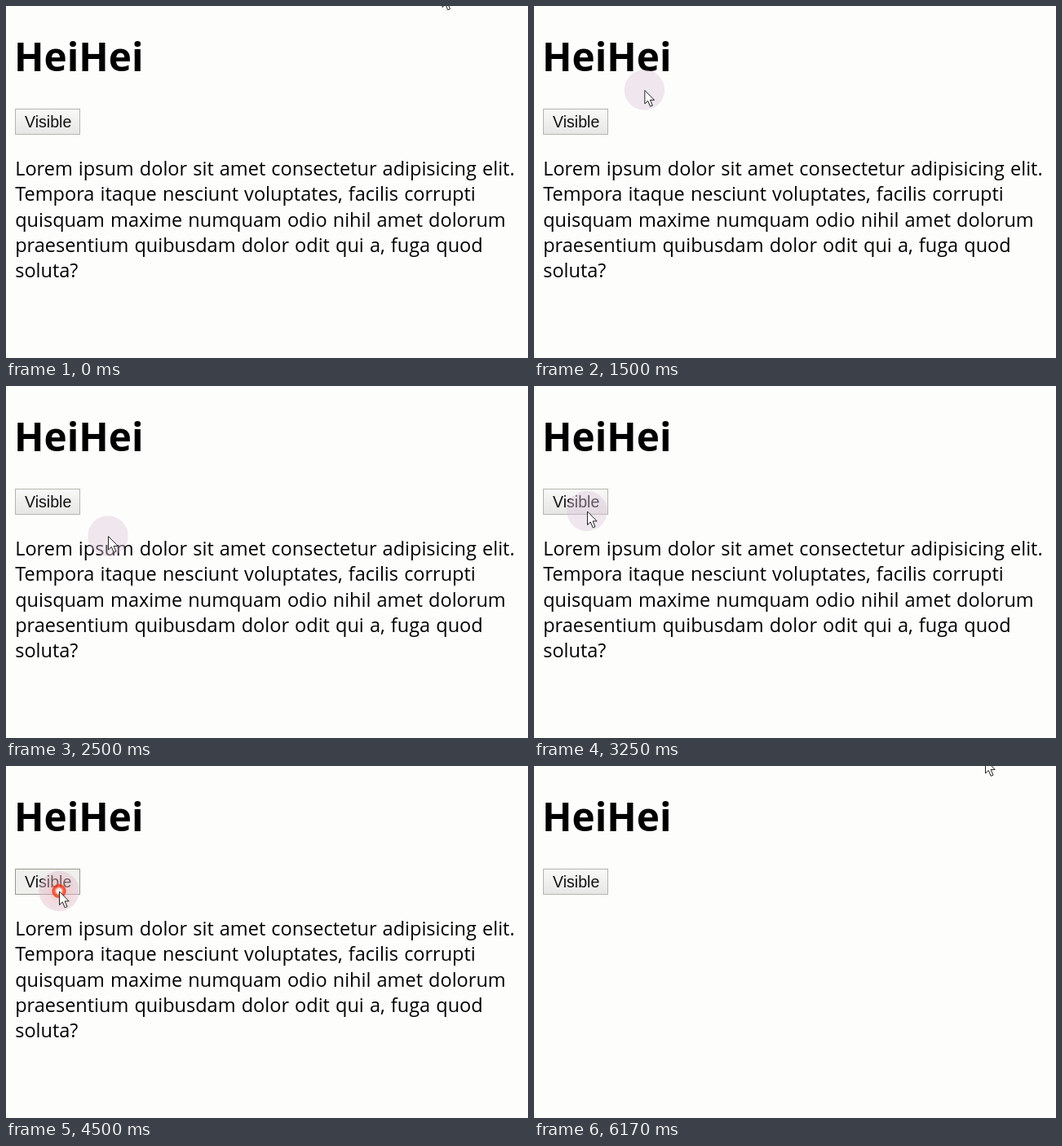
Write an HTML page that moves like this. It is 640 px wide and 432 px high and loops after 6260 ms.

```html
<!DOCTYPE html>
<html lang="en">
<head>
<meta charset="utf-8">
<title>Hover and toggle</title>
<style>
  html, body { margin: 0; width: 100%; height: 100%; overflow: hidden; background: #fdfdfb; }
  svg { display: block; width: 640px; height: 432px; }
  .body { font: 23.5px "Open Sans", "Noto Sans", sans-serif; word-spacing: 1px; }
  .title { font: bold 47.7px "Open Sans", "Noto Sans", sans-serif; }
  .label { font: 19.6px "Liberation Sans", Arial, sans-serif; }
</style>
</head>
<body>
<svg viewBox="0 0 640 432">
  <defs>
    <linearGradient id="face" x2="0" y2="1">
      <stop offset="0" stop-color="#f9f9f8"/>
      <stop offset="1" stop-color="#e6e6e5"/>
    </linearGradient>
    <radialGradient id="dot">
      <stop offset=".3" stop-color="#fff4ee"/>
      <stop offset=".6" stop-color="#f6401c"/>
      <stop offset=".85" stop-color="#ee3010"/>
      <stop offset="1" stop-color="#f05030" stop-opacity=".2"/>
    </radialGradient>
    <radialGradient id="glow">
      <stop offset="0" stop-color="#ff7050" stop-opacity=".3"/>
      <stop offset="1" stop-color="#ff9070" stop-opacity=".05"/>
    </radialGradient>
  </defs>
  <text class="title" x="10" y="79.5">HeiHei</text>
  <text id="extra" class="body" x="12" y="149">This is hide COntent</text>
  <g id="flow">
    <rect id="button" x="11.5" y="126.5" width="79" height="31" fill="url(#face)" stroke="#b4b5ac"/>
    <text class="label" x="23" y="149" fill="#111">Visible</text>
    <g id="para" class="body"></g>
  </g>
  <g id="pointer">
    <g id="halo">
      <circle r="24.7" fill="#dcc3da" fill-opacity=".4"/>
      <g id="click">
        <circle r="24.7" fill="url(#glow)"/>
        <circle id="ring" fill="url(#dot)"/>
      </g>
    </g>
    <path d="M.5 .5V17L4.3 13.4L7.2 20.3L10 19.1L7.1 12.4H12.2Z" fill="#fff" stroke="#222"/>
  </g>
</svg>
<script>
const LOOP = 6260, TICK = 1000 / 12;
const $ = id => document.getElementById(id);
const show = (el, on) => el.setAttribute('visibility', on ? 'inherit' : 'hidden');

const LINES = [
  'Lorem ipsum dolor sit amet consectetur adipisicing elit.',
  'Tempora itaque nesciunt voluptates, facilis corrupti',
  'quisquam maxime numquam odio nihil amet dolorum',
  'praesentium quibusdam dolor odit qui a, fuga quod',
  'soluta?'
];
LINES.forEach((line, i) => {
  const text = document.createElementNS('http://www.w3.org/2000/svg', 'text');
  text.setAttribute('x', 11.2);
  text.setAttribute('y', 207.8 + i * 31.4);
  text.textContent = line;
  $('para').append(text);
});

// Pointer path: tick, x, y
const PATH = [
  [0, 534.5, -15.5], [2, 420, 10], [4, 230, 50], [7, 104, 65], [8, 104, 65],
  [11, 306, 82], [13, 306, 82], [17, 140, 120], [20, 126, 69], [22, 126, 69],
  [25, 125.3, 103.3], [27, 125, 160], [28, 125, 160], [30, 125, 184], [33, 125, 38],
  [36, 65, 153.5], [62, 65, 153.5], [64, 68, 132], [66, 150, 70],
  [71, 553, -15], [74, 553, -8]
];

// Steady clicking; the paragraph toggles on release.
const PRESS = { first: 40.6, gap: 3.15, count: 7, release: 1 };

function pointerAt(tick) {
  const i = PATH.findIndex(p => p[0] >= tick);
  if (i < 1) return (i ? PATH[PATH.length - 1] : PATH[0]).slice(1);
  const [a, b] = [PATH[i - 1], PATH[i]];
  const k = (tick - a[0]) / (b[0] - a[0]);
  return [a[1] + (b[1] - a[1]) * k, a[2] + (b[2] - a[2]) * k];
}

// Number of presses begun by the given tick
function pressesBy(tick) {
  const n = Math.floor((tick - PRESS.first) / PRESS.gap) + 1;
  return Math.max(0, Math.min(PRESS.count, n));
}

function draw(ms) {
  const tick = Math.floor((ms % LOOP + 4) / TICK);
  const [x, y] = pointerAt(tick);
  const hover = tick < 60 && y > 33 && y < 98;
  show($('extra'), hover);
  $('flow').setAttribute('transform', `translate(0 ${hover ? 55.2 : 0})`);
  show($('para'), pressesBy(tick - PRESS.release) % 2 === 0);

  const presses = pressesBy(tick);
  const age = presses ? (tick - PRESS.first) - (presses - 1) * PRESS.gap : 99;
  const active = age < 3;
  show($('click'), active);
  if (active) {
    $('ring').setAttribute('r', 8 + age * 1.5);
    $('click').setAttribute('opacity', 1 - age * .25);
  }
  const down = age < PRESS.release;
  $('button').setAttribute('fill', down ? '#efefed' : 'url(#face)');
  $('button').setAttribute('stroke', active ? '#98998f' : '#b4b5ac');

  $('pointer').setAttribute('transform', `translate(${x} ${y})`);
  show($('pointer'), tick < 67 || tick > 71);
  show($('halo'), y >= 0);
}

const start = performance.now();
(function frame() {
  draw(performance.now() - start);
  requestAnimationFrame(frame);
})();
</script>
</body>
</html>
```
